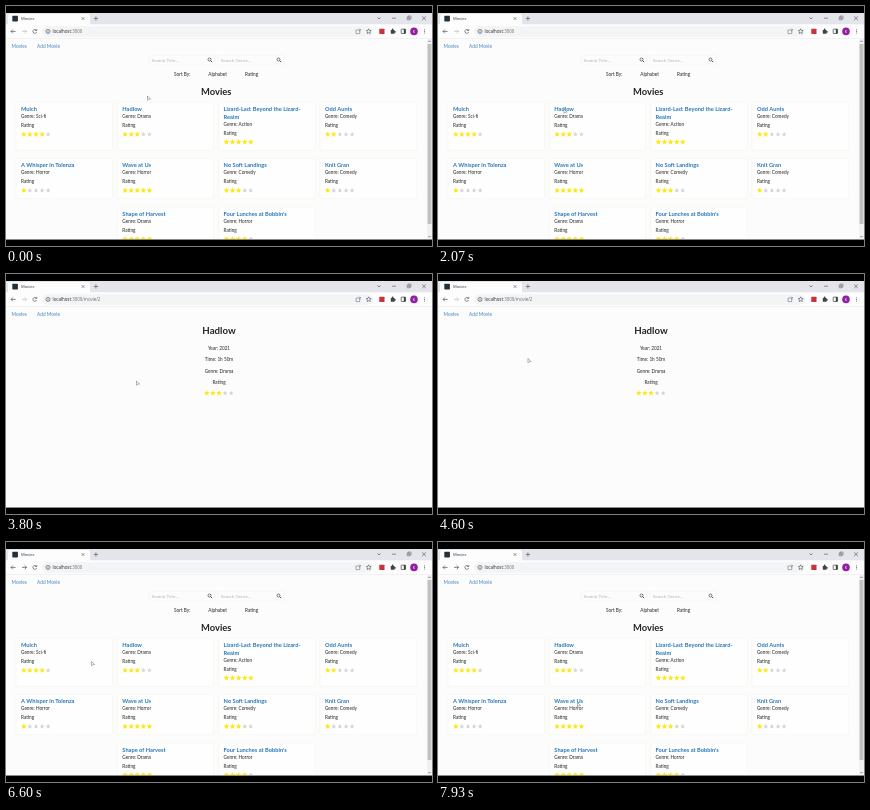
These frames come from a looping animation (426x240 px, 8000 ms). An HTML page with a canvas:

```html
<!DOCTYPE html>
<html lang="en">
<head>
<meta charset="utf-8">
<title>Movies</title>
<style>
  html, body { margin: 0; width: 100%; height: 100%; overflow: hidden; background: #000; }
  canvas { display: block; width: 426px; height: 240px; }
</style>
</head>
<body>
<canvas id="stage"></canvas>
<script>
const W = 426, H = 240, TOP = 7, BOTTOM = 234, BAR = 25.4;
const LOOP = 8000, STEP = 1000 / 15, OPEN_AT = 2200, BACK_AT = 5900;
const LATO = 'Lato, sans-serif', UI = '"Open Sans", sans-serif';
const INK = '#252627', LINK = '#4183c4', HEADER = '#2777b8', ICON = '#55595e';

const canvas = document.getElementById('stage');
const ctx = canvas.getContext('2d');
const scale = Math.max(1, window.devicePixelRatio || 1);
canvas.width = Math.round(W * scale);
canvas.height = Math.round(H * scale);

const movie = (title, genre, rating) => ({ lines: title.split('\n'), genre, rating });
const rows = [
  [
    movie('Mulch', 'Sci-fi', 4),
    movie('Hadlow', 'Drama', 3),
    movie('Lizard-Lad: Beyond the Lizard-\nRealm', 'Action', 5),
    movie('Odd Aunts', 'Comedy', 2)
  ], [
    movie('A Whisper in Tolenza', 'Horror', 1),
    movie('Wave at Us', 'Horror', 5),
    movie('No Soft Landings', 'Comedy', 3),
    movie('Knit Gran', 'Comedy', 1)
  ], [
    movie('Shape of Harvest', 'Drama', 5),
    movie("Four Lunches at Bobbin's", 'Horror', 4)
  ]
];
const chosen = rows[0][1];

// Where the pointer rests, and when it gets there
const MOVE = 650;
const stops = [
  { at: 0, x: 141.5, y: 90 },
  { at: 2050, x: 126, y: 103 },
  { at: 2900, x: 130.5, y: 107 },
  { at: 4500, x: 90, y: 84.5 },
  { at: 5500, x: 9, y: 25.5 },
  { at: 6560, x: 85.5, y: 119.5 },
  { at: 7800, x: 139.5, y: 160.5 }
];

const ease = p => p * p * (3 - 2 * p);
const clamp = p => Math.min(1, Math.max(0, p));

function pointerAt(t) {
  let { x, y } = stops[0];
  for (const s of stops.slice(1)) {
    const e = ease(clamp((t - s.at + MOVE) / MOVE));
    x += (s.x - x) * e;
    y += (s.y - y) * e;
  }
  return { x, y };
}

function fill(color) {
  ctx.fillStyle = color;
  ctx.fill();
}

function stroke(color, width = 0.65) {
  ctx.strokeStyle = color;
  ctx.lineWidth = width;
  ctx.stroke();
}

function box(x, y, w, h, r = 0) {
  ctx.beginPath();
  ctx.roundRect(x, y, w, h, r);
}

function rect(x, y, w, h, color, r) {
  box(x, y, w, h, r);
  fill(color);
}

function frame(x, y, w, h, color, r, width = 0.5) {
  box(x, y, w, h, r);
  stroke(color, width);
}

function arc(x, y, r, from = 0, to = 2 * Math.PI) {
  ctx.beginPath();
  ctx.arc(x, y, r, from, to);
}

function disc(x, y, r, color) {
  arc(x, y, r);
  fill(color);
}

function line(x1, y1, x2, y2, color = ICON, width) {
  ctx.beginPath();
  ctx.moveTo(x1, y1);
  ctx.lineTo(x2, y2);
  stroke(color, width);
}

function text(str, x, y, size, color = INK, { font = LATO, weight = 400, align = 'left' } = {}) {
  ctx.font = `${weight} ${size}px ${font}`;
  ctx.textAlign = align;
  ctx.fillStyle = color;
  ctx.fillText(str, x, y);
  return ctx.measureText(str).width;
}

function cross(x, y, r, turn = 0) {
  for (const a of [turn, turn + Math.PI / 2]) {
    const dx = r * Math.cos(a), dy = r * Math.sin(a);
    line(x - dx, y - dy, x + dx, y + dy);
  }
}

// Two strokes that meet in a tip facing the given angle
function chevron(x, y, r, angle, color = ICON) {
  for (const a of [angle + Math.PI * 0.75, angle - Math.PI * 0.75])
    line(x, y, x + r * Math.cos(a), y + r * Math.sin(a), color, 0.7);
}

function arrow(x, dir, color) {
  line(x - 2.3, BAR, x + 2.3, BAR, color, 0.75);
  chevron(x + dir * 2.3, BAR, 2.8, dir > 0 ? 0 : Math.PI, color);
}

function magnifier(x, y) {
  arc(x - 0.5, y - 0.5, 1.5);
  stroke('#444', 0.7);
  line(x + 0.6, y + 0.6, x + 2.1, y + 2.1, '#444', 0.9);
}

function starPath(x, y, r) {
  ctx.beginPath();
  for (let i = 0; i < 10; i++) {
    const a = (i / 5 - 0.5) * Math.PI, d = i % 2 ? r * 0.48 : r;
    ctx.lineTo(x + d * Math.cos(a), y + d * Math.sin(a));
  }
  ctx.closePath();
}

function stars(x, y, count) {
  for (let i = 0; i < 5; i++) {
    const on = i < count;
    starPath(x + i * 6.1, y, on ? 2.9 : 2.4);
    fill(on ? '#ffe81a' : '#d4d4d6');
  }
}

function drawTabs() {
  rect(0, TOP, W, 11.5, '#e3e5eb');
  rect(2, 8, 82, 11, '#fdfdfd', [2.5, 2.5, 0, 0]);
  rect(6.3, 9.8, 5.6, 5.6, '#22303a', 0.6);
  text('Movies', 15, 14.2, 4.1, '#33363a', { font: UI });
  cross(77, 12.5, 1.8, Math.PI / 4);
  cross(89.9, 12.5, 2.2);

  const slot = i => 373 + i * 15;
  chevron(slot(0), 13, 2.2, Math.PI / 2);
  line(slot(1) - 2, 12.2, slot(1) + 2, 12.2);
  for (const d of [0, 1]) frame(slot(2) - 1.8 + d, 11 - d, 2.8, 2.8, ICON);
  cross(slot(3), 12.3, 2.7, Math.PI / 4);
}

function drawToolbar(detail, canForward, hoverBack) {
  rect(0, 18.5, W, 14, '#fdfdfd');
  if (hoverBack) disc(7.3, BAR, 5.2, '#e4e6e9');
  arrow(7.3, -1, ICON);
  arrow(18.3, 1, canForward ? ICON : '#c0c3c6');
  arc(28.8, BAR, 1.9, 0.3, 5.5);
  stroke(ICON, 0.7);
  chevron(30.8, 24.6, 1.7, Math.PI / 4);

  rect(36, 20.2, 331, 10.6, '#f2f4f5', 5.3);
  arc(42, BAR, 2);
  stroke(ICON, 0.7);
  line(42, 25, 42, 26.6);
  disc(42, 24.2, 0.3, ICON);
  const host = text('localhost', 46.6, 27, 4.4, '#232528', { font: UI });
  text(detail ? ':3000/movie/2' : ':3000', 46.6 + host, 27, 4.4, '#6c7075', { font: UI });

  frame(350, 24, 3.8, 3.6, ICON, 0.3);
  chevron(354.6, 24, 1.8, 0);
  starPath(362.7, BAR, 2.6);
  stroke(ICON);
  rect(373.3, 22.8, 5.2, 5.2, '#c8323a', 0.5);
  rect(384.8, 24, 3.8, 3.8, '#3f4246', 0.4);
  disc(386.6, 23.5, 0.9, '#3f4246');
  disc(388.9, 25.8, 0.9, '#3f4246');
  frame(395.2, 23.1, 4.4, 4.4, '#3f4246', 0.3, 0.7);
  rect(397.8, 23.1, 1.8, 4.4, '#3f4246');
  disc(408, BAR, 3.8, '#9320a4');
  text('K', 408, 26.8, 3.8, '#fff', { font: UI, align: 'center' });
  for (const i of [-1, 0, 1]) disc(418.5, BAR + i * 1.7, 0.5, ICON);
  rect(0, 32.2, W, 0.5, '#e6e7e9');
}

function drawNav() {
  text('Movies', 5.6, 42.2, 4.8, LINK);
  text('Add Movie', 31, 42.2, 4.8, LINK);
}

function drawSearch(x, hint) {
  frame(x, 49.2, 66, 9.8, '#f3f3e4', 1);
  text(hint, x + 2.8, 55.7, 4.6, '#b4b4b8');
  magnifier(x + 61, 54);
}

function drawCard({ lines, genre, rating }, x, y, height) {
  const left = x + 5, lead = 7.6;
  const base = y + 9.1, last = base + (lines.length - 1) * lead;
  rect(x, y, 96.5, height, '#fefefe', 1);
  frame(x, y, 96.5, height, '#f3f3e2', 1);
  lines.forEach((str, i) => text(str, left, base + i * lead, 5.7, HEADER, { weight: 700 }));
  text('Genre: ' + genre, left, last + 7, 4.7);
  text('Rating', left, last + 16, 4.7);
  stars(left + 2.8, last + 23.1, rating);
}

function drawGrid() {
  const pitch = 101.3, gap = 8;
  let y = 96.2;
  for (const row of rows) {
    const height = 32.9 + 7.6 * Math.max(...row.map(m => m.lines.length));
    const first = 10 + pitch * (4 - row.length) / 2;
    row.forEach((m, i) => drawCard(m, first + i * pitch, y, height));
    y += height + gap;
  }
}

function drawScrollbar() {
  rect(421, 32.7, 5, 201.3, '#f1f1f1');
  rect(421.6, 38, 3.8, 180, '#c1c1c1');
  chevron(423.5, 34.8, 1.7, -Math.PI / 2);
  chevron(423.5, 231.2, 1.7, Math.PI / 2);
}

function drawList() {
  drawSearch(143, 'Search Title...');
  drawSearch(212, 'Search Genre...');
  text('Sort By:', 168, 69.7, 4.7);
  text('Alphabet', 202.3, 69.7, 4.7);
  text('Rating', 239, 69.7, 4.7);
  text('Movies', 210.2, 88.8, 9.4, INK, { weight: 700, align: 'center' });
  drawGrid();
  drawScrollbar();
}

function drawDetail() {
  const mid = 213, align = 'center';
  text(chosen.lines[0], mid, 59.8, 9.7, INK, { weight: 700, align });
  ['Year: 2021', 'Time: 1h 50m', 'Genre: ' + chosen.genre, 'Rating'].forEach((str, i) =>
    text(str, mid, 75.8 + i * 11.4, 4.7, INK, { align }));
  stars(mid - 12.2, 119.2, chosen.rating);
}

function drawPointer({ x, y }) {
  ctx.beginPath();
  ctx.moveTo(x, y);
  ctx.lineTo(x, y + 4.4);
  ctx.lineTo(x + 1.2, y + 3.2);
  ctx.lineTo(x + 3.1, y + 3.1);
  ctx.closePath();
  fill('#fff');
  stroke('#666', 0.5);
}

function draw(t) {
  const detail = t >= OPEN_AT && t < BACK_AT;
  const pointer = pointerAt(t);
  ctx.setTransform(canvas.width / W, 0, 0, canvas.height / H, 0, 0);
  rect(0, TOP, W, BOTTOM - TOP, '#fcfcfc');
  drawTabs();
  drawToolbar(detail, t >= BACK_AT, pointer.y < 32);
  drawNav();
  if (detail) drawDetail();
  else drawList();
  drawPointer(pointer);
  rect(0, BOTTOM - 1, W, 1, '#8a8a8a');
  rect(0, 0, W, TOP, '#000');
  rect(0, BOTTOM, W, H - BOTTOM, '#000');
}

const start = performance.now();
function tick() {
  const t = (performance.now() - start) % LOOP;
  draw(Math.floor((t + 4) / STEP) * STEP % LOOP);
  requestAnimationFrame(tick);
}
tick();
</script>
</body>
</html>
```
